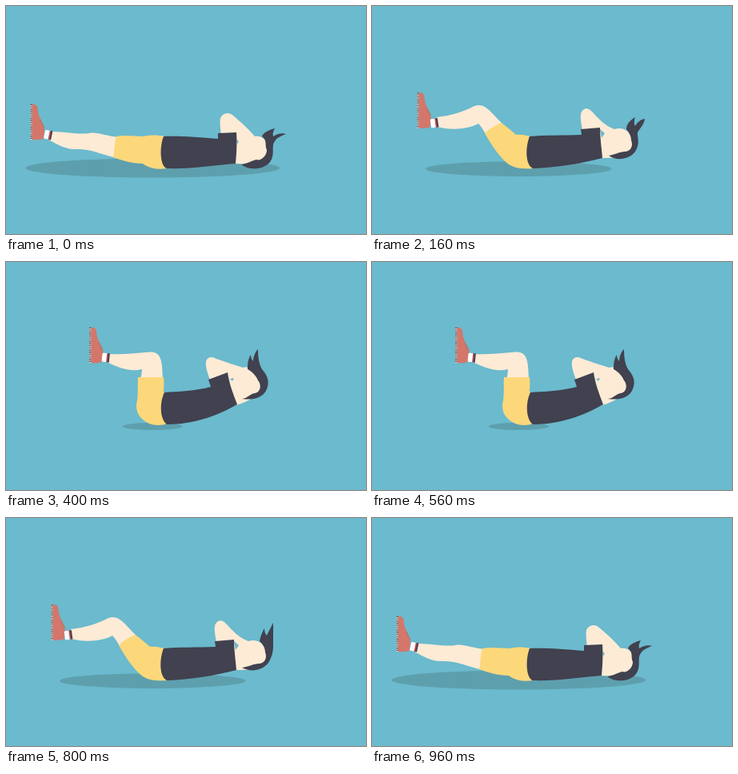
These frames come from a looping animation (450 by 285 pixels, 1.2 s). An HTML page:

```html
<!DOCTYPE html>
<html lang="en">
<head>
<meta charset="utf-8">
<title>Crunches</title>
<style>
  html, body { margin: 0; width: 100%; height: 100%; overflow: hidden; background: #6bbacd; }
  svg { display: block; width: 100vw; height: 100vh; }
</style>
</head>
<body>
<svg viewBox="0 0 450 285">
  <ellipse id="shadow" fill="#5e9fae"/>
  <path id="leg" fill="#feebd6"/>
  <g id="foot">
    <path fill="#d4766a" d="M1,0 C5,-1 8,0 9,4 C9,14 14,20 17,27 C18,33 17,38 16,43 C10,45 5,44 1,44Z"/>
    <path fill="none" stroke="#a8796f" stroke-width="1.2" d="M12,19 L17,29"/>
    <path stroke="#f6e3da" stroke-width="2.4" d="M1.2,0V44"/>
    <path stroke="#41414f" stroke-width="2.4" stroke-dasharray="1.1 1.1" d="M1.2,0V44"/>
    <g id="sock">
      <rect x="-4.5" y="-5.5" width="6.5" height="11" rx="1.5" fill="#fff"/>
      <rect x="1.2" y="-5.8" width="2" height="11.6" rx=".8" fill="#c8434f"/>
      <rect x="2.8" y="-5.8" width="2" height="11.6" rx=".8" fill="#41414f"/>
    </g>
  </g>
  <path id="shorts" fill="#fdd87b"/>
  <path id="skin" fill="#feebd6"/>
  <path id="gap" fill="#6bbacd"/>
  <path id="hair" fill="#41414f"/>
  <path id="shirt" fill="#41414f"/>
</svg>
<script>
const LOOP = 1200, STEP = 40, MOVE = 400, HOLD = 160;
const UP = [0, 0.352, 0.648, 1];
const DOWN = [0, 0.352, 1];

// Each part: the same outline from lying flat to fully curled
const parts = {
  leg: [
    'M55,157 C75,157 90,161 104,159 C114,157 125,163 142,164 L138,190 C115,184 105,178 86,179 C72,179 64,172 54,168Z',
    'M81,139 C100,137 114,132 126,126 C141,119 147,132 164,148 L144,163 C139,155 137,151 133,147 C118,155 97,155 81,151Z',
    'M102,127 C120,124 134,118 148,115 C168,109 170,121 183,144 L154,153 C153,147 152,141 152,135 C137,145 118,143 102,139Z',
    'M128,115 C145,116 160,114 174,113 C194,110 195,120 196,146 L168,147 C169,142 170,138 170,134 C156,138 141,132 128,126Z'
  ],
  shorts: [
    'M138,163 C150,161 160,163 172,163 C180,161 190,161 198,163 L201,203 C186,205 178,202 171,197 C157,197 145,193 134,189 C136,180 135,171 138,163Z',
    'M161,146 C168,150 174,156 180,161 C187,160 192,162 198,163 L202,203 C190,204 179,203 171,198 C160,190 150,175 141,159 C147,153 154,149 161,146Z',
    'M182,142 C186,148 187,156 189,162 C193,162 195,163 198,163 L202,203 C188,205 175,202 168,194 C160,182 155,165 151,149 C161,144 172,141 182,142Z',
    'M197,144 C198,150 197,157 197,162 C197,162 198,163 198,163 L202,202 C190,206 178,204 170,196 C164,190 163,185 163,178 C166,166 164,155 165,144 C176,139 187,139 197,144Z'
  ],
  skin: [
    'M269,162 C268,152 267,146 268,140 C271,133 279,132 284,137 C295,146 305,156 311,163 C325,160 331,178 326,187 C318,198 300,198 286,197 L286,165Z',
    'M263,157 C262,147 260,141 261,135 C263,127 270,126 275,132 C283,141 292,150 303,154 C320,148 330,168 326,179 C316,190 300,190 286,190 L283,157Z',
    'M260,155 C258,143 256,136 257,129 C259,122 266,121 270,125 C280,132 290,140 300,144 C316,138 326,157 323,168 C313,180 300,184 287,182 L279,150Z',
    'M256,150 C252,139 249,131 250,124 C252,118 258,118 263,121 C275,125 286,129 296,132 C313,128 322,149 319,159 C312,169 300,176 287,179 L274,142Z'
  ],
  gap: [
    'M288,167 L291,169 L289,173Z',
    'M285,154 L291,159 L287,165Z',
    'M283,153 L288,156 L286,160Z',
    'M280,146 L285,145 L283,149Z'
  ],
  shirt: [
    'M197,163 C215,162 240,164 265,166 L265,159 L288,158 C289,172 288,186 287,197 C260,199 230,204 201,203 C192,200 192,175 197,163Z',
    'M197,163 C215,161 240,162 262,161 L261,154 L285,152 C285,165 287,178 288,190 C262,197 230,202 201,203 C191,198 192,175 197,163Z',
    'M197,163 C215,162 240,162 260,157 L258,151 L281,146 C282,158 286,170 289,182 C265,194 235,202 201,203 C191,197 192,175 197,163Z',
    'M198,163 C215,162 238,161 256,156 L253,147 L277,138 C279,152 284,165 289,178 C265,192 235,203 201,203 C192,196 192,175 198,163Z'
  ]
};

const hair = [
  'M294,198 C303,206 322,205 330,195 C337,186 331,175 336,169 C339,164 345,162 350,160 C345,158 339,160 334,163 C333,160 334,156 336,153 C328,155 321,159 320,163 C327,168 323,173 326,180 C326,188 318,194 313,192 C308,193 302,197 294,198Z',
  'M296,187 C305,194 322,192 329,182 C336,171 331,163 332,158 C335,153 340,148 341,141 C335,142 331,146 329,150 C327,147 328,142 329,139 C322,143 318,148 318,154 C322,159 324,163 324,168 C327,175 323,182 316,182 C310,182 303,186 296,187Z',
  'M294,181 C306,184 320,180 327,173 C334,163 331,155 327,147 C326,140 331,132 332,126 C326,128 322,132 320,137 C318,135 317,131 318,127 C314,131 312,138 313,144 C317,148 321,153 320,158 C324,164 322,172 316,173 C308,175 303,179 294,181Z',
  'M295,171 C308,173 320,170 325,161 C331,149 326,141 320,134 C316,127 315,118 315,109 C311,113 309,119 309,124 C307,122 306,119 306,116 C302,122 302,129 302,134 C309,138 313,143 315,148 C320,154 318,163 311,164 C304,165 303,170 295,171Z'
];
const hairFalling = 'M295,187 C306,193 320,191 328,181 C334,171 334,164 334,158 C334,149 334,140 334,131 C331,137 328,142 326,147 C324,145 323,142 323,138 C320,143 318,148 317,154 C322,159 324,163 324,168 C327,175 323,182 316,182 C310,182 303,186 295,187Z';

const $ = id => document.getElementById(id);
const lerp = (a, b, k) => a + (b - a) * k;
const smooth = s => s * s * (3 - 2 * s);

// Lagrange weights: a smooth curve through every pose
const weights = (nodes, e) => nodes.map((n, i) =>
  nodes.reduce((w, m, j) => i === j ? w : w * (e - m) / (n - m), 1));
const mix = (values, w) => values.reduce((sum, v, i) => sum + v * w[i], 0);

function shape(poses) {
  const sets = poses.map(p => p.match(/\d+/g).map(Number));
  return w => {
    let i = 0;
    return poses[0].replace(/\d+/g, () => {
      const k = i++;
      return mix(sets.map(s => s[k]), w).toFixed(2);
    });
  };
}

const body = Object.entries(parts).map(([id, poses]) => [$(id), shape(poses)]);
const hairUp = shape(hair);
const hairDown = shape([hair[0], hairFalling, hair[3]]);

function curl(t) {
  if (t < MOVE) return smooth(t / MOVE);
  if (t <= MOVE + HOLD) return 1;
  return smooth(Math.max(0, (2 * MOVE + HOLD - t) / MOVE));
}

function draw(t) {
  const e = curl(t), w = weights(UP, e);
  for (const [el, path] of body) el.setAttribute('d', path(w));

  const falling = t > MOVE + HOLD;
  const sway = t > MOVE && !falling ? 0.04 * Math.sin(Math.PI * (t - MOVE) / HOLD) : 0;
  $('hair').setAttribute('d', falling ? hairDown(weights(DOWN, e)) : hairUp(weights(UP, e + sway)));

  $('foot').setAttribute('transform', `translate(${lerp(30.5, 104, e)} ${lerp(123, 82, e)})`);
  $('sock').setAttribute('transform',
    `translate(${lerp(22, 20.5, e)} ${lerp(38, 37.5, e)}) rotate(${mix([12, -8, -10, 6], w)})`);

  const shadow = { cx: 183.3, cy: lerp(202.5, 205.5, e), rx: lerp(159, 37.5, e), ry: lerp(12, 4.5, e) };
  for (const k in shadow) $('shadow').setAttribute(k, shadow[k]);
}

const start = performance.now();
function tick() {
  const t = (performance.now() - start) % LOOP;
  draw(Math.floor(t / STEP) * STEP);
  requestAnimationFrame(tick);
}
tick();
</script>
</body>
</html>
```
